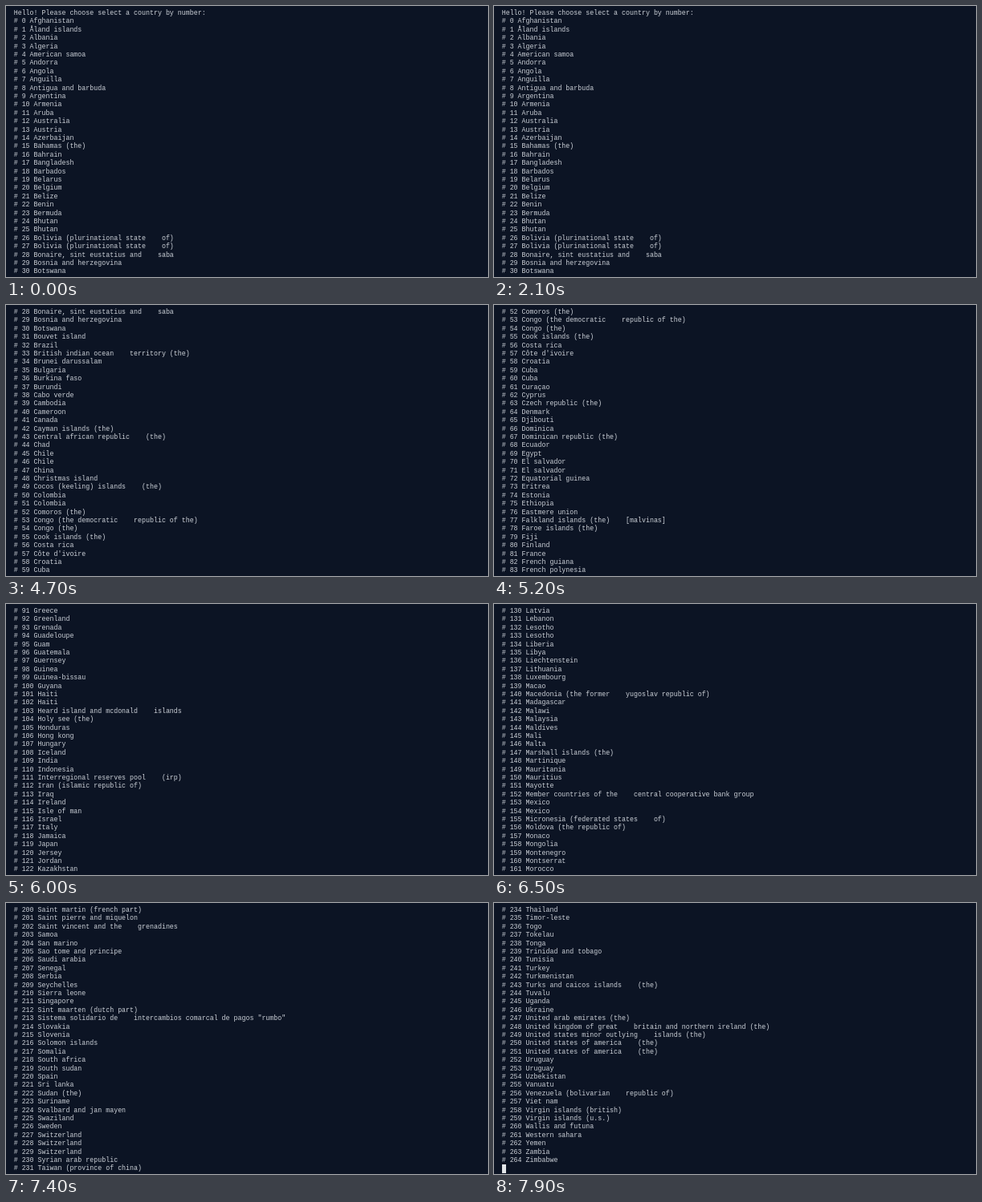
An HTML page for the animation above (8 s loop, 600 px wide and 338 px high).

```html
<!DOCTYPE html>
<html lang="en">
<head>
<meta charset="utf-8">
<title>Country list</title>
<style>
  html, body {
    margin: 0;
    width: 100%;
    height: 100%;
    overflow: hidden;
    background: #0c1424;
  }
  #screen {
    position: absolute;
    left: 9.7px;
    top: 3.9px;
    margin: 0;
    font: 8.3px/10.4px "Liberation Mono", "Courier New", monospace;
    color: #ccd1d8;
    white-space: pre;
  }
  #cursor {
    position: absolute;
    left: 9.7px;
    top: 326.3px;
    width: 5.2px;
    height: 10.4px;
    background: #e4e7ea;
    visibility: hidden;
  }
</style>
</head>
<body>
<pre id="screen"></pre>
<div id="cursor"></div>
<script>
const names = `Afghanistan|Åland islands|Albania|Algeria|American samoa|Andorra|Angola|Anguilla
Antigua and barbuda|Argentina|Armenia|Aruba|Australia|Austria|Azerbaijan|Bahamas (the)|Bahrain
Bangladesh|Barbados|Belarus|Belgium|Belize|Benin|Bermuda|Bhutan|Bhutan
Bolivia (plurinational state of)|Bolivia (plurinational state of)
Bonaire, sint eustatius and saba|Bosnia and herzegovina|Botswana|Bouvet island|Brazil
British indian ocean territory (the)|Brunei darussalam|Bulgaria|Burkina faso|Burundi|Cabo verde
Cambodia|Cameroon|Canada|Cayman islands (the)|Central african republic (the)|Chad|Chile|Chile
China|Christmas island|Cocos (keeling) islands (the)|Colombia|Colombia|Comoros (the)
Congo (the democratic republic of the)|Congo (the)|Cook islands (the)|Costa rica|Côte d'ivoire
Croatia|Cuba|Cuba|Curaçao|Cyprus|Czech republic (the)|Denmark|Djibouti|Dominica
Dominican republic (the)|Ecuador|Egypt|El salvador|El salvador|Equatorial guinea|Eritrea|Estonia
Ethiopia|Eastmere union|Falkland islands (the) [malvinas]|Faroe islands (the)|Fiji|Finland|France
French guiana|French polynesia|French southern territories (the)|Gabon|Gambia (the)|Georgia
Germany|Ghana|Gibraltar|Greece|Greenland|Grenada|Guadeloupe|Guam|Guatemala|Guernsey|Guinea
Guinea-bissau|Guyana|Haiti|Haiti|Heard island and mcdonald islands|Holy see (the)|Honduras
Hong kong|Hungary|Iceland|India|Indonesia|Interregional reserves pool (irp)
Iran (islamic republic of)|Iraq|Ireland|Isle of man|Israel|Italy|Jamaica|Japan|Jersey|Jordan
Kazakhstan|Kenya|Kiribati|Korea (the democratic people's republic of)|Korea (the republic of)
Kuwait|Kyrgyzstan|Lao people's democratic republic (the)|Latvia|Lebanon|Lesotho|Lesotho|Liberia
Libya|Liechtenstein|Lithuania|Luxembourg|Macao|Macedonia (the former yugoslav republic of)
Madagascar|Malawi|Malaysia|Maldives|Mali|Malta|Marshall islands (the)|Martinique|Mauritania
Mauritius|Mayotte|Member countries of the central cooperative bank group|Mexico|Mexico
Micronesia (federated states of)|Moldova (the republic of)|Monaco|Mongolia|Montenegro|Montserrat
Morocco|Mozambique|Myanmar|Namibia|Namibia|Nauru|Nepal|Netherlands (the)|New caledonia
New zealand|Nicaragua|Niger (the)|Nigeria|Niue|Norfolk island|Northern mariana islands (the)
Norway|Oman|Pakistan|Palau|Palestine, state of|Panama|Papua new guinea|Paraguay|Peru
Philippines (the)|Pitcairn|Poland|Portugal|Puerto rico|Qatar|Réunion|Romania
Russian federation (the)|Rwanda|Saint barthélemy|Saint helena, ascension and tristan da cunha
Saint kitts and nevis|Saint lucia|Saint martin (french part)|Saint pierre and miquelon
Saint vincent and the grenadines|Samoa|San marino|Sao tome and principe|Saudi arabia|Senegal
Serbia|Seychelles|Sierra leone|Singapore|Sint maarten (dutch part)
Sistema solidario de intercambios comarcal de pagos "rumbo"|Slovakia|Slovenia|Solomon islands
Somalia|South africa|South sudan|Spain|Sri lanka|Sudan (the)|Suriname|Svalbard and jan mayen
Swaziland|Sweden|Switzerland|Switzerland|Switzerland|Syrian arab republic
Taiwan (province of china)|Tajikistan|Tanzania, united republic of|Thailand|Timor-leste|Togo
Tokelau|Tonga|Trinidad and tobago|Tunisia|Turkey|Turkmenistan|Turks and caicos islands (the)
Tuvalu|Uganda|Ukraine|United arab emirates (the)
United kingdom of great britain and northern ireland (the)
United states minor outlying islands (the)|United states of america (the)
United states of america (the)|Uruguay|Uruguay|Uzbekistan|Vanuatu
Venezuela (bolivarian republic of)|Viet nam|Virgin islands (british)|Virgin islands (u.s.)
Wallis and futuna|Western sahara|Yemen|Zambia|Zimbabwe`.split(/[|\n]/);

const LOOP = 8000, TICK = 100, ROWS = 32;

// Long names carry a four-space gap where they were once wrapped
const gap = s => s.length > 28 ? s.replace(/^(.{1,28}) /, "$1    ") : s;

const lines = [
  "Hello! Please choose select a country by number:",
  ...names.map((name, i) => `# ${i} ${gap(name)}`),
  ""
];
const end = lines.length - ROWS;

// [time in ms, first visible line]
const scroll = [
  [0, 0], [3200, 0], [3600, 9], [4300, 9], [5200, 53],
  [6000, 92], [7000, 170], [7850, end], [LOOP, end]
];

function topLine(t) {
  const i = scroll.findIndex(key => key[0] > t);
  const [t0, a] = scroll[i - 1], [t1, b] = scroll[i];
  return Math.round(a + (b - a) * (t - t0) / (t1 - t0));
}

const screenEl = document.getElementById("screen");
const cursorEl = document.getElementById("cursor");
let shown = -1;

function draw() {
  const t = performance.now() % LOOP;
  const top = topLine(Math.floor(t / TICK) * TICK);
  if (top !== shown) {
    shown = top;
    screenEl.textContent = lines.slice(top, top + ROWS).join("\n");
    cursorEl.style.visibility = top === end ? "visible" : "hidden";
  }
  requestAnimationFrame(draw);
}
draw();
</script>
</body>
</html>
```
